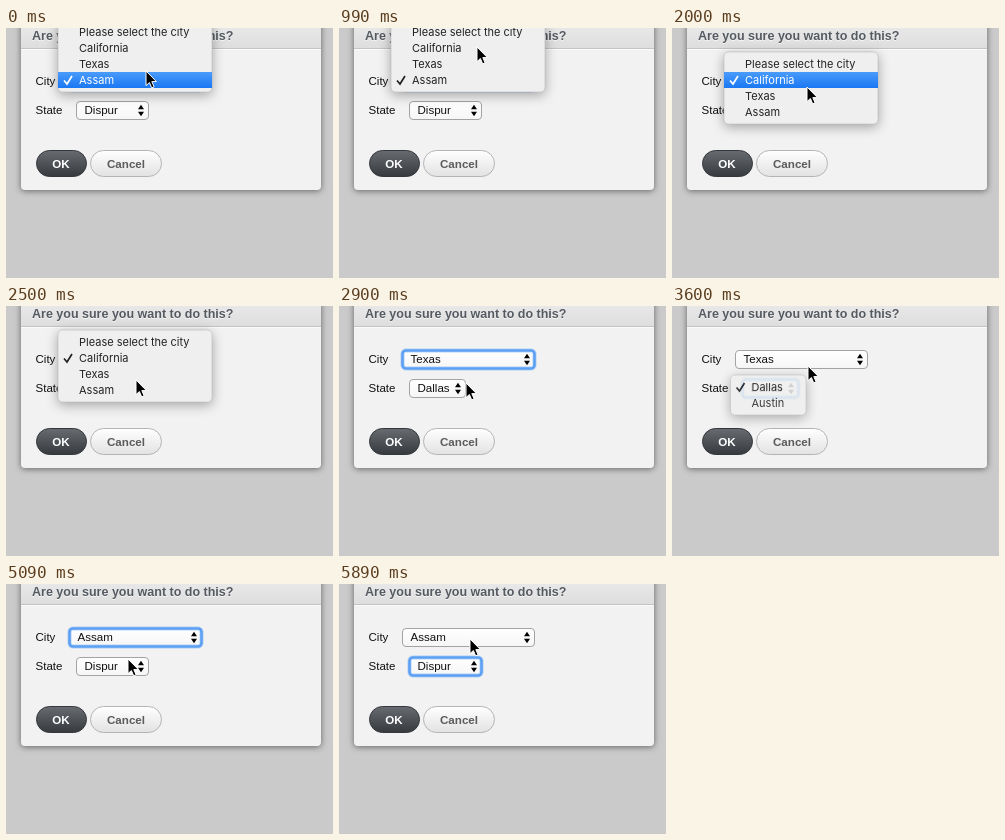
Write an HTML page that moves like this. It is 327 px wide and 250 px high and loops after 5.99 s.

```html
<!DOCTYPE html>
<html lang="en">
<head>
<meta charset="utf-8">
<title>Dependent selects</title>
<style>
html, body { margin: 0; width: 100%; height: 100%; overflow: hidden; background: #cacaca; }
svg { display: block; width: 327px; height: 250px; }
text { font: 11.55px "Liberation Sans", Arial, sans-serif; fill: #111; white-space: pre; }
.title { font-size: 12.5px; font-weight: bold; fill: #555a61; }
.button { font-size: 11.6px; font-weight: bold; text-anchor: middle; }
.dialog { filter: drop-shadow(0 1px 3px rgba(0,0,0,.5)); }
.box { fill: url(#field); stroke: #a3a3a3; }
.ring { fill: none; stroke: #5c9ff3; stroke-width: 2.6; }
.halo { fill: none; stroke: #8dbcf6; stroke-width: 4.5; opacity: .45; }
.menu { filter: drop-shadow(0 3px 6px rgba(0,0,0,.32)); }
.menu text { font: 11px Inter, sans-serif; fill: #222; }
.menu .lit text { fill: #fff; }
.check { fill: none; stroke: #222; stroke-width: 1.7; }
.lit .check { stroke: #fff; }
</style>
</head>
<body>
<svg viewBox="0 0 327 250">
  <defs>
    <linearGradient id="bar" x2="0" y2="1"><stop stop-color="#ececec"/><stop offset="1" stop-color="#dedede"/></linearGradient>
    <linearGradient id="field" x2="0" y2="1"><stop stop-color="#fff"/><stop offset="1" stop-color="#f6f6f6"/></linearGradient>
    <linearGradient id="dark" x2="0" y2="1"><stop stop-color="#686c71"/><stop offset="1" stop-color="#363a3f"/></linearGradient>
    <linearGradient id="light" x2="0" y2="1"><stop stop-color="#fff"/><stop offset="1" stop-color="#e2e2e2"/></linearGradient>
    <linearGradient id="blue" x2="0" y2="1"><stop stop-color="#4a9bfb"/><stop offset="1" stop-color="#1a78f4"/></linearGradient>
  </defs>
  <rect width="327" height="250" fill="#cacaca"/>
  <rect class="dialog" x="15" y="-20" width="300" height="182" rx="4" fill="#f2f2f2"/>
  <rect x="15" y="-10" width="300" height="30" fill="url(#bar)"/>
  <path d="M15 20.5H315" stroke="#c4c4c4"/>
  <path d="M15 21.5H315" stroke="#fafafa"/>
  <text class="title" x="26" y="13" fill-opacity=".7" style="fill:#fff">Are you sure you want to do this?</text>
  <text class="title" x="26" y="12">Are you sure you want to do this?</text>
  <text x="29.5" y="57">City</text>
  <text x="29.5" y="86">State</text>
  <rect x="30.5" y="122.5" width="50" height="26" rx="13" fill="url(#dark)" stroke="#34373b"/>
  <text class="button" x="55" y="140" style="fill:#fff">OK</text>
  <rect x="84.5" y="122.5" width="71" height="26" rx="13" fill="url(#light)" stroke="#b4b4b4"/>
  <text class="button" x="120" y="140" style="fill:#5c5c5c">Cancel</text>
  <g id="fields"></g>
  <g id="menu" class="menu"></g>
  <path id="cursor" d="M0 0V14.6L3.4 11.5L5.7 16.8L8.1 15.8L5.8 10.6H10.4Z" stroke="#fff" stroke-width="1"/>
</svg>
<script>
const LOOP = 5990;
const CITIES = ["Please select the city", "California", "Texas", "Assam"];
const STATES = [[], ["Los Angeles"], ["Dallas", "Austin"], ["Dispur"]];
const STATE_RIGHT = [0, 158.5, 126.5, 142.5];

// Each step changes only the listed parts; lit is the highlighted row.
const steps = [
  [0, { city: 3, region: 3, focus: "city", menu: "city", lit: 3, alpha: 1, at: [140, 43] }],
  [100, { lit: 2, at: [139, 31] }],
  [200, { lit: 1, at: [138, 19] }],
  ...pick(890, 1000, 1100, 1200, 1),
  [1300, { region: 1, at: [134, 48] }],
  [1400, { at: [131, 66] }],
  [1500, { at: [134, 59] }],
  [1600, { at: [136, 53] }],
  [1700, { menu: "city", lit: 1, alpha: 1 }],
  [1900, { at: [136, 55] }],
  [2000, { at: [135, 59] }],
  [2100, { at: [134, 64], lit: 2 }],
  [2200, { at: [132, 70] }],
  [2300, { at: [130, 74] }],
  ...pick(2500, 2600, 2700, 2800, 2),
  [2900, { region: 2, at: [127, 77] }],
  [3000, { at: [123, 79] }],
  [3100, { menu: "state", focus: "state", lit: 0, alpha: 1 }],
  [3400, { lit: -1, at: [130, 68] }],
  [3500, { at: [135, 62] }],
  [3600, { alpha: .88, at: [136, 60] }],
  [3700, { menu: "" }],
  [3800, { menu: "city", focus: "city", lit: 2, alpha: 1 }],
  [3900, { lit: 3 }],
  [4200, { at: [131, 64] }],
  [4300, { at: [127, 68] }],
  ...pick(4500, 4590, 4690, 4790, 3),
  [4890, { region: 3, at: [125, 70] }],
  [4990, { at: [123, 73] }],
  [5090, { at: [122, 75] }],
  [5190, { menu: "state", focus: "state", lit: 0, alpha: 1 }],
  [5390, { lit: -1 }],
  [5490, { lit: 0 }],
  [5590, { alpha: .5 }],
  [5690, { menu: "", at: [124, 69] }],
  [5790, { at: [128, 61] }],
  [5890, { at: [131, 55] }]
];

// A chosen city blinks off and on, then its menu fades and closes.
function pick(off, on, fade, close, city) {
  return [
    [off, { lit: -1 }],
    [on, { lit: city }],
    [fade, { alpha: .5 }],
    [close, { menu: "", city }]
  ];
}

function field(x, y, right, label, focused) {
  const frame = `x="${x}" y="${y}" width="${right - x}" height="18" rx="3.5"`;
  const ring = focused ? `<rect class="halo" ${frame}/><rect class="ring" ${frame}/>` : "";
  const ax = right - 7.5, ay = y + 9;
  return `<rect class="box" ${frame}/>${ring}
    <text x="${x + 8}" y="${y + 12.5}">${label}</text>
    <path d="M${ax - 3} ${ay - 1.3}h6l-3 -4.4zM${ax - 3} ${ay + 1.3}h6l-3 4.4z"/>`;
}

function list(x, y, right, items, checked, lit) {
  const width = right - x;
  const rows = items.map((label, i) => {
    const top = y + 16 * i;
    const bar = i === lit ? `<rect x="${x}" y="${top}" width="${width}" height="16" fill="url(#blue)"/>` : "";
    const check = i === checked ? `<path class="check" d="M${x + 6} ${top + 8.5}l3 3.5l5 -8"/>` : "";
    return `<g class="${i === lit ? "lit" : ""}">${bar}${check}<text x="${x + 21}" y="${top + 12}">${label}</text></g>`;
  });
  return `<rect x="${x}" y="${y - 4}" width="${width}" height="${16 * items.length + 8}" rx="4.5"
    fill="#eeefee" stroke="#bbb" stroke-width=".6"/>` + rows.join("");
}

const [fields, menu, cursor] = ["fields", "menu", "cursor"].map(id => document.getElementById(id));
let shown = -1;

function draw(index) {
  const s = Object.assign({}, ...steps.slice(0, index + 1).map(step => step[1]));
  const right = STATE_RIGHT[s.region];
  fields.innerHTML =
    field(63.5, 44.5, 195.5, CITIES[s.city], s.focus === "city") +
    field(70.5, 73.5, right, STATES[s.region][0], s.focus === "state");
  menu.innerHTML =
    s.menu === "city" ? list(52, 44 - 16 * s.city, 206, CITIES, s.city, s.lit) :
    s.menu === "state" ? list(58.5, 73, right + 7.5, STATES[s.region], 0, s.lit) : "";
  menu.setAttribute("opacity", s.alpha);
  cursor.setAttribute("transform", `translate(${s.at})`);
}

function tick() {
  const t = performance.now() % LOOP;
  const index = steps.filter(step => step[0] <= t).length - 1;
  if (index !== shown) draw(shown = index);
  requestAnimationFrame(tick);
}
tick();
</script>
</body>
</html>
```
